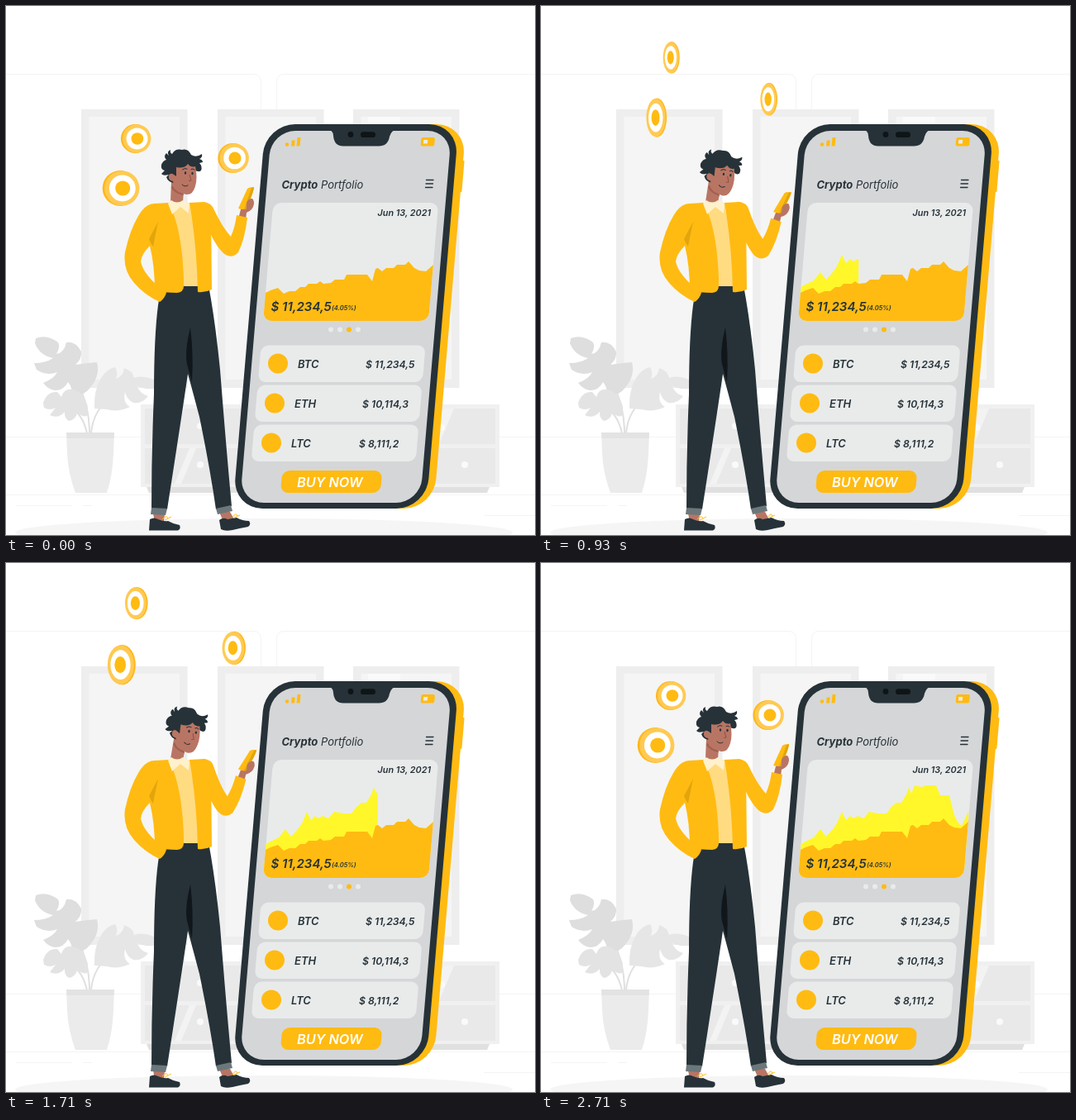
Write an HTML page that moves like this. It is 640 by 640 pixels and loops after 2.78 s.

```html
<!DOCTYPE html>
<html lang="en">
<head>
<meta charset="utf-8">
<style>
html, body { margin: 0; width: 100%; height: 100%; overflow: hidden; background: #fff; }
svg { display: block; width: 100%; height: 100%; }
text { font-family: Inter, "Open Sans", sans-serif; font-style: italic; font-weight: 600; fill: #263238; }
.dark { fill: #263238; }
.gold { fill: #ffbb12; }
.card { fill: #e9ebeb; }
.skin { fill: #b97564; }
.line { fill: none; stroke: #263238; stroke-linecap: round; }
</style>
</head>
<body>
<svg viewBox="0 0 640 640">
  <defs>
    <clipPath id="cardClip"><rect x="343.5" y="238" width="200" height="143" rx="10" transform="matrix(1 0 -.085 1 0 0)"/></clipPath>
    <clipPath id="reveal"><rect id="revealBox" x="300" y="230" width="0" height="160"/></clipPath>
  </defs>

  <g id="room">
    <g fill="none" stroke="#f4f4f4">
      <path d="M0 82.5H299Q308.500 82.500 308.500 92V125M327.500 125V92Q327.500 82.500 337 82.500H640"/>
      <path d="M0 521.500H640M0 591.500H640M12 604.500H80M93 604.500H104M578 616.500H640"/>
    </g>
    <g id="pictures"></g>
    <path fill="#e0e0e0" d="M170 582H585L582 589H173Z"/>
    <rect x="163" y="482" width="434" height="100" fill="#f0f0f0"/>
    <path fill="#e9e9e9" d="M168 487H377V530H168ZM383 487H592V530H383ZM168 535H377V578H168ZM383 535H592V578H383Z"/>
    <path fill="#f3f3f3" d="M200 487H216L196 530H180ZM529 487H542L524 530H511ZM222 535H230L212 578H204Z"/>
    <g fill="#fafafa"><circle cx="235" cy="555" r="4"/><circle cx="555" cy="555" r="4"/><circle cx="235" cy="508" r="4"/><circle cx="527" cy="510" r="4"/></g>
    <ellipse cx="312" cy="637" rx="301" ry="17" fill="#f5f5f5"/>
  </g>

  <g id="plant">
    <path fill="none" stroke="#e0e0e0" stroke-width="2" d="M101 517Q101 470 72 433M103 517Q105 485 139 463M98 517Q92 489 70 481"/>
    <path fill="#dedede" d="M36 402Q50 397 63 407Q66 412 61 421Q70 420 73 407Q84 405 91 418Q92 427 84 434Q96 432 110 431Q115 449 98 466Q89 473 78 472Q82 463 75 455Q70 465 59 465Q51 464 45 456Q58 451 62 443Q49 448 37 440L34 432Q48 432 57 426Q41 423 35 408Z"/>
    <path fill="#e6e6e6" d="M107 487Q106 465 115 450Q122 439 132 437Q136 443 133 451Q142 448 143 438Q153 441 155 450Q165 446 181 453Q190 458 180 463Q164 464 158 459Q163 470 172 472Q164 482 154 480Q146 476 144 467Q141 480 150 485Q135 492 122 488Z"/>
    <path fill="#e3e3e3" d="M45 480Q50 466 62 467L67 473Q70 462 81 464Q95 468 99 485L98 496Q91 498 86 490Q86 500 76 502Q70 498 71 491Q63 500 53 495L60 486Q53 490 46 486Z"/>
    <path fill="#ebebeb" d="M73 516H131L130 541Q129 568 122 589H84Q75 565 74 541Z"/>
    <path fill="#e3e3e3" d="M73 516H131L130.500 523H73.500Z"/>
  </g>

  <g id="phone">
    <g transform="matrix(1 0 -.085 1 0 0)">
      <rect class="gold" x="334" y="143" width="235" height="465" rx="36"/>
      <rect class="gold" x="567" y="187" width="3.500" height="38" rx="1"/>
      <rect class="dark" x="326" y="143" width="234" height="465" rx="36"/>
      <rect x="334" y="151" width="218" height="450" rx="29" fill="#d5d6d8"/>
      <rect class="card" x="343.500" y="238" width="200" height="143" rx="10"/>
      <g class="card">
        <rect x="343.500" y="410.500" width="199" height="44.500" rx="9"/>
        <rect x="343.500" y="458.500" width="199" height="44.500" rx="9"/>
        <rect x="343.500" y="506.500" width="199" height="44.500" rx="9"/>
      </g>
      <rect class="gold" x="382" y="562" width="121" height="27" rx="9"/>
      <path class="gold" d="M359.500 162.500H363.500V169.500H359.500ZM366 159H370V169.500H366Z"/>
      <rect class="gold" x="516" y="159" width="16.500" height="10.500" rx="2"/>
      <rect class="card" x="519" y="162" width="5" height="4.500"/>
    </g>
    <circle class="gold" cx="340" cy="167.500" r="2.200"/>
    <path class="dark" d="M388 149Q396 150 396 157Q397 169.500 408 169.500H451Q462 169.500 464 158Q466 150 474 149Z"/>
    <g fill="#0f1417"><circle cx="417" cy="155.500" r="3.400"/><rect x="429" y="152.300" width="18" height="6.800" rx="3.400"/></g>
    <path class="line" stroke-width="1.300" d="M508.500 210.500H517M508 215H516.500M507.500 219.500H516"/>
    <g clip-path="url(#cardClip)">
      <path clip-path="url(#reveal)" fill="#fff72a" d="M310 342L322 336L330 332L338 322L345 331L353 322L358 315L364 301L369 311L374 306L378 309L383 306L390 309L397 301L409 303L418 303L424 295L430 290L436 290L442 280L445 271L448 279L452 269L460 271L466 269L478 269L483 281L494 281L500 305L504 313L509 318L517 300V390H310Z"/>
      <path class="gold" d="M310 349L320 344L329 341L336 348L343 345L350 345L356 340L362 340L366 336L376 336L380 333L384 336L393 335L398 331L409 331L412 325H437L443 333L447 318L450 317L455 321L460 317H469L473 313H483L487 309L494 317L500 320L508 321L517 313V390H310Z"/>
    </g>
    <g class="card"><circle cx="393" cy="391.500" r="3"/><circle cx="404" cy="391.500" r="3"/><circle cx="426" cy="391.500" r="3"/></g>
    <circle class="gold" cx="415" cy="391.500" r="3"/>
    <g class="gold"><circle cx="329" cy="432.500" r="12"/><circle cx="325" cy="480.500" r="12"/><circle cx="321" cy="528.500" r="12"/></g>
    <text x="333.500" y="221" font-size="13"><tspan font-weight="700">Crypto</tspan><tspan font-weight="400"> Portfolio</tspan></text>
    <text x="514" y="254" font-size="10.800" text-anchor="end">Jun 13, 2021</text>
    <text x="320.500" y="368.500" font-size="15">$ 11,234,5</text>
    <text x="394" y="368" font-size="7.500" font-weight="700">(4.05%)</text>
    <g font-size="13"><text x="353" y="437.500">BTC</text><text x="349" y="485.500">ETH</text><text x="345" y="533.500">LTC</text></g>
    <g font-size="12.200"><text x="435" y="437.500">$ 11,234,5</text><text x="431" y="485.500">$ 10,114,3</text><text x="427" y="533.500">$ 8,111,2</text></g>
    <text x="352" y="581.500" font-size="16.300" style="fill:#fff">BUY NOW</text>
  </g>

  <g id="man">
    <path class="skin" d="M178 614H192L191 624H180ZM258 612H271L276 621L263 624Z"/>
    <path class="dark" d="M174 621Q179 618 184 621Q191 624 196 623Q203 627 210 628Q212 633 208 634.500H173ZM258 622Q263 618 268 621L279 619Q286 623 294 623Q297 627 293 630Q282 632 274 634Q265 636 260 633Z"/>
    <path fill="none" stroke="#ffbb12" d="M189 621Q194 615 196 620M192 622L200 618M274 619Q278 612 280 617M276 619L283 616"/>
    <path class="dark" d="M188 338H245Q253 380 259 440Q266 530 273 605L254 609Q247 560 234 497Q225 463 220 445Q212 500 195 609L176 608Q176 540 179 470Q179 400 184 362Z"/>
    <path fill="#10161a" d="M223 389Q216 418 219 433L225 455Q227 420 223 389Z"/>
    <path fill="#6b777b" d="M176 607L195 608L193 616L175 615ZM254 608L272 604L274 611L256 615Z"/>
    <path fill="#ffdb82" d="M196 239L223 238L232 250L234 339H209Z"/>
    <path class="gold" d="M180 239L197 238Q213 270 215 330V339Q215 346 207 347Q192 347 180 344Q180 315 174 290Q164 300 163 309Q166 326 194 347Q192 354 186 358Q168 350 155 335Q141 319 144 298Q151 266 164 248Q171 239 180 239ZM222 238L240 237Q248 238 248 250L249 343Q241 347 232 346Q231 290 222 238Z"/>
    <path fill="#e3a50c" d="M184 261L173 282Q175 287 178 291Q181 275 184 261Z"/>
    <g id="head">
      <path class="skin" d="M200 212L215 222L214 238Q207 241 199 237Z"/>
      <path fill="#a1604f" d="M201 217Q206 226 214 226L215 229Q204 227 200 220Z"/>
      <path class="dark" d="M203 214Q196 213 194 207L197 204Q190 206 188 203L192 199Q187 198 188 192Q190 187 194 186Q190 182 194 178L197 181Q194 176 199 174Q198 178 201 179Q205 172 213 174Q220 172 224 180Q230 184 237 179Q238 183 234 185Q238 186 238 189L234 190Q238 194 236 199Q233 202 228 198L210 206Z"/>
      <path class="skin" d="M206 195Q216 197 220 191Q224 196 229 194Q232 208 229 218Q226 229 218 228Q206 226 202 212Q196 211 197 205Q199 201 203 204L206 206Z"/>
      <g class="dark"><ellipse cx="217" cy="202" rx="1.200" ry="1.700"/><ellipse cx="225.500" cy="202.500" rx="1.200" ry="1.700"/></g>
      <path class="line" stroke-width="1" d="M213.500 198Q216 195.500 219 197M224 197.500Q226 196 228 198M213 216Q216 219.500 220 217"/>
      <path fill="none" stroke="#8e4f41" d="M222 204L224 211L221 211.500"/>
    </g>
    <path fill="#fff1cb" d="M196 239L200 235Q207 240 214 235L222 239L221 251L211 243L201 252Z"/>
    <g id="arm">
      <path class="skin" d="M281 258L285 242Q289 238 293 233Q300 233 300 239Q299 247 291 250L290 259Z"/>
      <path class="gold" d="M292 221Q294 219 300 219Q300 224 291 245Q288 247 281 245Z"/>
      <path fill="#e3a50c" d="M297 220L300 219Q300 224 291 245L288 246Z"/>
      <path class="skin" d="M291 238Q293 233 298 233Q301 236 299 241Q296 247 291 248Z"/>
      <path class="gold" d="M236 238Q248 236 252 247Q262 268 272 279Q277 268 279 253L292 256Q289 282 281 298Q273 307 263 299Q252 288 246 272Z"/>
    </g>
  </g>
  <g id="coins"></g>
</svg>
<script>
const LOOP = 2780, END = 2710;
const get = id => document.getElementById(id);

get('pictures').innerHTML = [91, 256, 420].map(x =>
  `<rect x="${x}" y="125" width="128.5" height="337" fill="#eee"/>
   <rect x="${x + 9.5}" y="134" width="109.500" height="318" fill="#f5f5f5"/>`).join('') +
  '<rect x="438" y="134" width="39" height="12" fill="#fafafa"/>';

// Resting centre, radius and rise of each coin
const coins = [
  { x: 157.5, y: 160.5, r: 17.5, rise: 131 },
  { x: 139.5, y: 220.5, r: 21.5, rise: 114 },
  { x: 275.5, y: 184, r: 18, rise: 95 }
];
get('coins').innerHTML = coins.map(() =>
  `<g><circle cx="-.06" r="1" fill="#ffb71a"/><circle cx=".04" r=".98" fill="#ffca52"/>
   <circle cx=".06" r=".74" fill="#fff"/><circle cx=".08" r=".42" class="gold"/></g>`).join('');

// Smooth curve through [time, value] keys, at rest at both ends
function curve(keys) {
  const slope = keys.map((key, i) => {
    const a = keys[i - 1], b = keys[i + 1];
    return a && b ? (b[1] - a[1]) / (b[0] - a[0]) : 0;
  });
  return t => {
    let i = 0;
    while (i < keys.length - 2 && t > keys[i + 1][0]) i++;
    const [t0, v0] = keys[i], [t1, v1] = keys[i + 1];
    const d = t1 - t0, p = (t - t0) / d, q = 1 - p;
    return q * q * ((1 + 2 * p) * v0 + p * d * slope[i]) +
           p * p * ((3 - 2 * p) * v1 - q * d * slope[i + 1]);
  };
}
const lift = curve([[0, 0], [220, .02], [430, .118], [570, .302], [930, .748], [1210, 1],
  [1360, 1.06], [1710, .855], [2070, .39], [2290, .118], [2490, .02], [END, 0]]);
const spin = curve([[0, 0], [570, 34], [930, 120], [1210, 225], [1710, 492], [2070, 644], [END, 720]]);

function draw(now) {
  const t = Math.min(now % LOOP, END), up = lift(t);
  const turn = Math.cos(spin(t) * Math.PI / 180);
  coins.forEach(({ x, y, r, rise }, i) => {
    const size = r * (1 + .17 * up * up);
    get('coins').children[i].setAttribute('transform',
      `translate(${x} ${y - rise * up}) scale(${size * turn} ${size})`);
  });
  get('head').setAttribute('transform', `rotate(${8.5 * up} 207 238)`);
  get('arm').setAttribute('transform', `rotate(${8.5 * up} 245 247)`);
  get('revealBox').setAttribute('width', 6 + .084 * t);
}

const start = performance.now();
(function tick() {
  draw(performance.now() - start);
  requestAnimationFrame(tick);
})();
</script>
</body>
</html>
```
